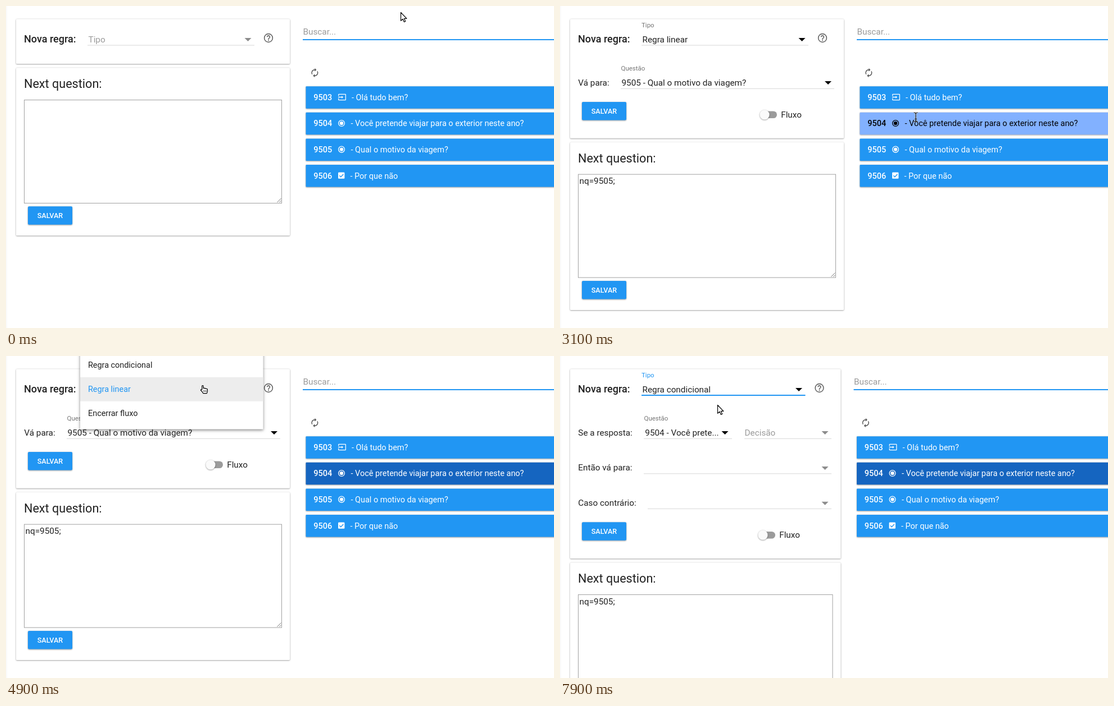
An HTML page for the animation above (8 s loop, 975x574 px).

```html
<!DOCTYPE html>
<html lang="pt">
<head>
<meta charset="utf-8">
<title>Nova regra</title>
<style>
  html, body { margin: 0; width: 100%; height: 100%; overflow: hidden; background: #fff; }
  svg { display: block; width: 975px; height: 574px; font-family: Roboto, Arial, sans-serif; }
  text { white-space: pre; }
  .raised { filter: drop-shadow(0 1px 1px rgba(0,0,0,.3)) drop-shadow(0 0 1px rgba(0,0,0,.14)); }
  .menu { filter: drop-shadow(0 2px 2px rgba(0,0,0,.3)) drop-shadow(0 1px 3px rgba(0,0,0,.2)); }
</style>
</head>
<body>
<svg id="stage" viewBox="0 0 975 574"></svg>
<script>
const stage = document.getElementById('stage');
const LOOP = 8000, BLUE = '#2196f3', INK = '#212121', HINT = '#9a9a9a', LABEL = '#757575';
const FIELD = 15.3, ROW = 14.45;

const text = (x, y, s, size = FIELD, fill = INK, extra = '') =>
  `<text x="${x}" y="${y}" font-size="${size}" fill="${fill}" ${extra}>${s}</text>`;
const rect = (x, y, w, h, fill, extra = '') =>
  `<rect x="${x}" y="${y}" width="${w}" height="${h}" fill="${fill}" ${extra}/>`;
const path = (d, extra) => `<path d="${d}" ${extra}/>`;
const at = (x, y, scale, body) => `<g transform="translate(${x} ${y}) scale(${scale})">${body}</g>`;
const card = (y, w, h) => rect(18, y, w, h, '#fff', 'rx="1.5" class="raised"');
const line = (x1, x2, y, active) => active
  ? rect(x1, y - 1, x2 - x1, 2, BLUE) : rect(x1, y - .5, x2 - x1, 1, '#d8d8d8');
const caret = (x, y, fill = '#000') => path(`M${x - 6} ${y - 3}h12l-6 6z`, `fill="${fill}"`);
const button = y => rect(39, y, 79, 32.5, BLUE, 'rx="2" class="raised"') +
  text(78.5, y + 20.8, 'SALVAR', 12.6, '#fff', 'font-weight="500" text-anchor="middle"');
const toggle = (x, y) => rect(x - 6, y - 6.3, 28, 12.6, '#9b9b9b', 'rx="6.3"') +
  `<circle cx="${x}" cy="${y}" r="8.6" fill="#fafafa" class="raised"/>` + text(x + 29.2, y + 5.2, 'Fluxo');

const mix = (a, b, p) => `rgb(${a.map((v, i) => Math.round(v + (b[i] - v) * p))})`;
const latest = (keys, t) => keys.filter(k => k[0] <= t).pop();

const ICONS = {
  help: 'M11 18h2v-2h-2zm1-16a10 10 0 1 0 0 20a10 10 0 1 0 0-20zm0 18a8 8 0 1 1 0-16a8 8 0 1 1 0 16zm0-14c-2.2 0-4 1.8-4 4h2c0-1.1.9-2 2-2s2 .9 2 2c0 2-3 1.75-3 5h2c0-2.25 3-2.5 3-5 0-2.2-1.8-4-4-4z',
  renew: 'M12 6v3l4-4-4-4v3a8 8 0 0 0-6.76 12.26L6.7 14.8A6 6 0 0 1 12 6zm6.76 1.74L17.3 9.2A6 6 0 0 1 12 18v-3l-4 4 4 4v-3a8 8 0 0 0 6.76-12.26z',
  input: 'M21 3H3a2 2 0 0 0-2 2v4h2V5h18v14H3v-4H1v4a2 2 0 0 0 2 2h18a2 2 0 0 0 2-2V5a2 2 0 0 0-2-2zM11 16l4-4-4-4v3H1v2h10z'
};
const icon = (name, cx, cy, scale, fill) =>
  at(cx - 12 * scale, cy - 12 * scale, scale, path(ICONS[name], `fill="${fill}"`));

const rowIcon = {
  input: (y, ink) => icon('input', 598, y, .63, ink),
  radio: (y, ink) => `<circle cx="597" cy="${y}" r="5.4" fill="none" stroke="${ink}" stroke-width="1.3"/><circle cx="597" cy="${y}" r="3.2" fill="${ink}"/>`,
  check: (y, ink, back) => rect(591, y - 5.7, 11.4, 11.4, ink, 'rx="1.3"') +
    path(`M593.3 ${y}l2.5 2.5 4.5-4.8`, `fill="none" stroke="${back}" stroke-width="1.4"`)
};

const ROWS = [
  ['9503', 'input', 615, 'Olá tudo bem?'],
  ['9504', 'radio', 613.5, 'Você pretende viajar para o exterior neste ano?'],
  ['9505', 'radio', 613.5, 'Qual o motivo da viagem?'],
  ['9506', 'check', 612.5, 'Por que não']
];

function hover(row, t) {
  if (row === 0) return latest([[0, 0], [3500, .39], [3700, .3], [3900, .1], [4100, 0]], t)[1];
  if (row !== 1 || t < 1100) return 0;
  if (t >= 3500) return latest([[3500, .43], [3700, .06], [3900, 0]], t)[1];
  return 1 - (1 - Math.min(1, (t - 1100) / 600)) ** 1.5;
}

function list(t) {
  const rows = ROWS.map(([id, kind, x, label], i) => {
    const y = 143.3 + i * 46.55, p = hover(i, t);
    const base = i === 1 && t >= 3100 ? [21, 101, 192] : [33, 150, 243];
    const back = mix(base, [130, 177, 255], p), ink = mix([255, 255, 255], [0, 0, 0], p);
    return rect(533.5, y, 460, 39.5, back, 'rx="1" class="raised"') +
      text(547.3, y + 24.6, id, ROW, ink, 'font-weight="500"') +
      rowIcon[kind](y + 19.2, ink, back) + text(x, y + 24.6, '- ' + label, ROW, ink);
  }).join('');
  return text(528.5, 51.3, 'Buscar...', FIELD, HINT) + rect(528, 59, 470, 2, BLUE) +
    icon('renew', 549.3, 119, .76, '#555') + rows;
}

function question(dy, narrow, script) {
  const y = 168 + dy, right = 490.5 - narrow;
  return card(110.3 + dy, 487 - narrow, 299) + text(32, 146.2 + dy, 'Next question:', 21.6) +
    rect(32.5, y - .5, right - 32.5, 184, '#fff', 'stroke="#a0a0a0"') +
    path(`M${right - 8} ${y + 182}l7-7m-3 7l3-3`, 'stroke="#666" stroke-width=".9"') +
    text(34.5, y + 149.2 - 149.2 + 149 - 149 + 16.7 - 168 + 168 - 0, script) + button(357.3 + dy);
}

function typeField(value, narrow, active) {
  const right = 442 - narrow;
  return text(32, 65, 'Nova regra:', 18, INK, 'font-weight="500"') +
    (value ? text(145, 38, 'Tipo', 11.5, active ? BLUE : LABEL) : '') +
    text(146.5, 64.5, value || 'Tipo', FIELD, value ? INK : HINT) +
    line(145, right, 70, active) + caret(430.5 - narrow, 60, value ? '#000' : '#8c8c8c') +
    icon('help', 467 - narrow, 57, .82, '#666');
}

const linearRule = active => card(23.3, 487, 212.5) + typeField('Regra linear', 0, active) +
  text(32.3, 141.7, 'Vá para:') + text(108.5, 115, 'Questão', 11.5, LABEL) +
  text(109.5, 141.7, '9505 - Qual o motivo da viagem?') + line(108, 488, 147.3) + caret(477, 137) +
  button(171) + toggle(364, 193.8);

const conditionalRule = labelAlpha => card(23.3, 481.5, 337.7) + typeField('Regra condicional', 5.5, true) +
  text(32.3, 141.7, 'Se a resposta:') + text(149.5, 115, 'Questão', 11.5, LABEL, `opacity="${labelAlpha}"`) +
  text(151.3, 141.7, '9504 - Você prete...') + line(149, 306, 147.3) + caret(293.5, 137) +
  text(328.5, 141.7, 'Decisão', FIELD, HINT) + line(328, 483, 147.3) + caret(471.5, 137, '#8c8c8c') +
  text(32.3, 204.3, 'Então vá para:') + line(149, 483, 209.8) + caret(471.5, 200, '#8c8c8c') +
  text(32.3, 266.9, 'Caso contrário:') + line(156, 483, 272.3) + caret(471.5, 262.7, '#8c8c8c') +
  button(296.3) + toggle(361, 319.2);

function menu(t) {
  const over = latest([[0, 0], [6700, .6], [6900, 1]], t)[1];
  const ripple = latest([[0, 0], [6900, 60], [7100, 113]], t)[1];
  return `<g opacity="${t < 4900 ? .9 : 1}">` +
    rect(132, -30, 325.5, 160.5, '#fff', 'class="menu"') + rect(132, -5, 325.5, 42.7, '#ededed', `opacity="${over}"`) +
    rect(132, 37.7, 325.5, 43, '#ededed') +
    `<clipPath id="item">${rect(132, -5, 325.5, 42.7, '#000')}</clipPath>` +
    `<circle cx="308" cy="16" r="${ripple}" fill="#000" opacity=".1" clip-path="url(#item)"/>` +
    text(146, 21, 'Regra condicional', 14.4) + text(146, 64, 'Regra linear', 14.4, BLUE) +
    text(146, 107, 'Encerrar fluxo', 14.4) + '</g>';
}

const OUTLINE = 'fill="#fff" stroke="#000" stroke-width="1.2" stroke-linejoin="round"';
const BEAM = 'M-3.5-8Q0-8 0-6Q0-8 3.5-8M0-6V6M-3.5 8Q0 8 0 6Q0 8 3.5 8M-2 3.5H2';
const CURSORS = {
  arrow: path('M0 0V14.8L3.5 11.7 5.9 17 8.2 16 5.9 10.8H10.4Z', OUTLINE),
  beam: path(BEAM, 'fill="none" stroke="#fff" stroke-width="2.6" opacity=".7"') +
    path(BEAM, 'fill="none" stroke="#000" stroke-width="1.2"'),
  hand: path('M3.2 8V1.8Q3.2.6 4.4.6T5.6 1.8V5.4Q7.2 4.6 8 5.9Q9.6 5.2 10.4 6.5Q12.8 6 12.9 8V11Q12.7 13 11.6 14.6H5.4Q4.2 12 .8 8.8Q1.2 7 3.2 8Z', OUTLINE) +
    path('M6.3 9v3M8.5 9v3M10.7 9v3', 'stroke="#000" stroke-width=".8"')
};
const GLIDE_END = 1200;
const TRACK = [
  [0, 702.5, 11.5, 'arrow'], [200, 706, 20, 'arrow'], [500, 690, 62, 'arrow'], [900, 653, 149, 'arrow'],
  [1100, 667, 208, 'arrow'], [1200, 671, 222, 'arrow'], [1300, 671, 223, 'arrow'],
  [1400, 668, 219, 'beam'], [1700, 667, 218, 'beam'], [1900, 666, 217.5, 'beam'], [2000, 665, 217, 'beam'],
  [3100, 633, 198, 'beam'], [3300, 606, 182, 'beam'], [3500, 564, 156, 'beam'],
  [3700, 537, 143, 'arrow'], [3900, 371, 67, 'arrow'], [4100, 345.5, 52, 'hand'],
  [6200, 344, 51, 'hand'], [6400, 329.5, 36.5, 'hand'], [6700, 322, 20, 'hand'],
  [7500, 320.5, 38.5, 'arrow'], [7700, 300, 66.5, 'arrow'], [7900, 280.5, 87.5, 'arrow']
];

function cursor(t) {
  const from = latest(TRACK, t), to = TRACK[TRACK.indexOf(from) + 1];
  const p = t < GLIDE_END ? (t - from[0]) / (to[0] - from[0]) : 0;
  const [x, y] = [1, 2].map(i => p ? from[i] + (to[i] - from[i]) * p : from[i]);
  return at(x, y, 1, CURSORS[from[3]]);
}

function scene(t) {
  let panel;
  if (t < 3100) panel = card(23.3, 487, 79.7) + typeField('', 0, false) + question(0, 0, '');
  else if (t < 7500) panel = linearRule(t >= 4500) + question(132.6, 0, 'nq=9505;');
  else panel = conditionalRule(t < 7700 ? .5 : 1) + question(257.9, 5.5, 'nq=9505;');
  const shift = t >= 7500 ? -5.5 : 0;
  return rect(0, 0, 2, 574, '#fafafa') + panel + at(shift, 0, 1, list(t)) +
    (t >= 4700 && t < 7500 ? menu(t) : '') + cursor(t);
}

let shown = -1;
const start = performance.now();
function tick() {
  const t = Math.floor(((performance.now() - start) % LOOP) / 100) * 100;
  if (t !== shown) stage.innerHTML = scene(shown = t);
  requestAnimationFrame(tick);
}
tick();
</script>
</body>
</html>
```
